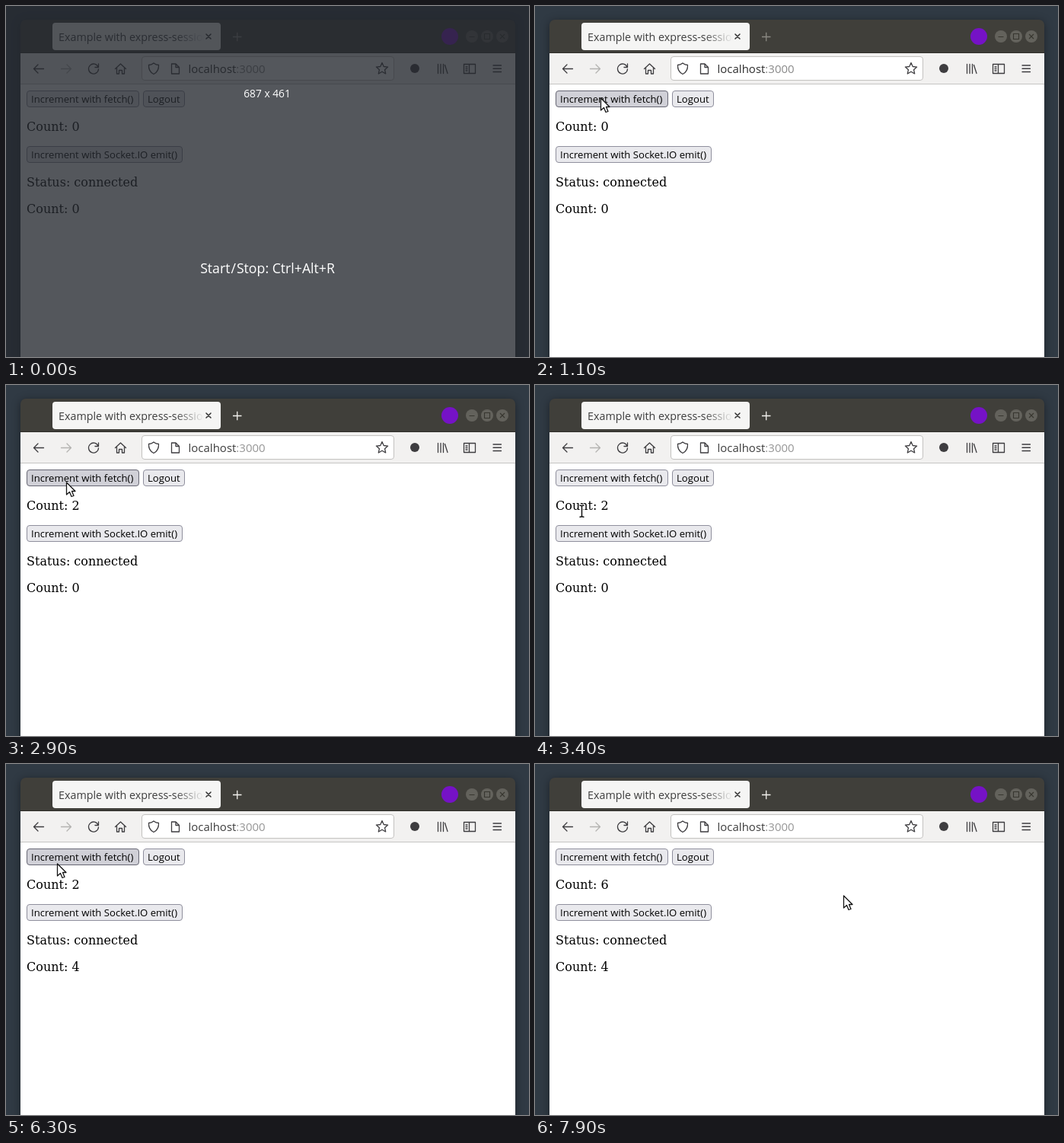
Write an HTML page that moves like this. It is 687 by 461 pixels and loops after 8000 ms.

```html
<!DOCTYPE html>
<html lang="en">
<head>
<meta charset="utf-8">
<title>Session counter</title>
<style>
html, body { margin: 0; width: 100%; height: 100%; overflow: hidden; background: #303a44; }
svg { display: block; width: 687px; height: 461px; }
text { font-family: "Open Sans", "Noto Sans", sans-serif; white-space: pre; }
.window { fill: #403f3a; filter: drop-shadow(0 2px 6px rgba(0, 0, 0, .4)); }
.icon { fill: none; stroke: #3e3d40; stroke-width: 1.3; stroke-linecap: round; stroke-linejoin: round; }
.off { stroke: #b4b3b1; }
.close { stroke: #2e2e2e; stroke-width: 1.5; }
.control { fill: #63625c; }
.glyph { fill: none; stroke: #37362f; stroke-width: 1.1; }
.url { font-size: 15px; }
#host { fill: #2e2e2e; }
#port { fill: #8a8a8a; }
#plus { fill: none; stroke: #8a8983; stroke-width: 1.3; }
.focused #host { fill: #3d3d3d; }
.focused #port { fill: #969696; }
.focused #plus { stroke: #f2f1ee; }
.button rect { fill: #e9e9ed; stroke: #8f8f9d; }
.button text { font-size: 13.15px; font-weight: 500; }
.button.hover rect { fill: #d0d0d7; stroke: #676774; }
.button.pressed rect { fill: #b1b1b9; stroke: #484851; }
.page { font: 16px "DejaVu Serif", serif; }
#overlay text { fill: #fff; font-weight: 500; text-anchor: middle; }
#arrow { fill: #fff; stroke: #161616; stroke-width: 1.3; stroke-linejoin: round; }
#beam { fill: none; }
</style>
</head>
<body>
<svg id="stage" viewBox="0 0 687 461">
  <defs>
    <linearGradient id="fade" gradientUnits="userSpaceOnUse" x1="222" x2="260" y1="0" y2="0">
      <stop stop-color="#3d3d3d"/><stop offset="1" stop-color="#3d3d3d" stop-opacity="0"/>
    </linearGradient>
    <path id="back" d="M6.5 0h-13l5.500-5.500m-5.500 5.500l5.500 5.500"/>
    <path id="cross" d="M-3-3l6 6m0-6l-6 6"/>
    <path id="bar" d="M-2.500-7l3 .7 3-.7m-3 .7v14m-3 .7l3-.7 3 .7"/>
  </defs>

  <rect width="687" height="461" fill="#303a44"/>
  <rect class="window" x="19" y="18" width="650" height="480" rx="7"/>

  <!-- title bar -->
  <rect x="19" y="61" width="650" height="1" fill="#2f2e2a"/>
  <rect x="61" y="22" width="221" height="36" rx="4" fill="#f5f5f4"/>
  <text x="69" y="46" font-size="14.3" fill="url(#fade)">Example with express-session</text>
  <use href="#cross" class="icon close" x="266" y="40"/>
  <path id="plus" d="M298 40.500h11.500m-5.750-5.750v11.500"/>
  <circle cx="583" cy="40" r="11" fill="#7512c6"/>
  <g class="control"><circle cx="612" cy="40" r="8"/><circle cx="632" cy="40" r="8"/><circle cx="652" cy="40" r="8"/></g>
  <path class="glyph" d="M608.500 40.500h7m13-4h7v7h-7z"/>
  <use href="#cross" class="glyph" x="652" y="40"/>

  <!-- toolbar -->
  <rect x="19" y="62" width="650" height="40" fill="#f2f1f0"/>
  <rect x="19" y="102" width="650" height="1" fill="#c6c5c3"/>
  <rect x="19" y="103" width="650" height="358" fill="#fff"/>
  <rect x="178.5" y="66.5" width="331" height="31" rx="3.5" fill="#fff" stroke="#c3c2c0"/>
  <g class="icon">
    <use href="#back" x="43" y="82.5"/>
    <use href="#back" class="off" transform="translate(79 82.5) scale(-1 1)"/>
    <path d="M121 80a6.500 6.500 0 1 0 .5 3m0-7v4.500h-4.500"/>
    <path d="M143.500 82.500l7-6.500 7 6.500m-12-1.500v8h3v-4.500h4v4.500h3v-8"/>
    <path d="M194 75q3 2.500 6.500 2.500 .5 8.500-6.500 12-7-3.500-6.500-12 3.500 0 6.500-2.500z"/>
    <path d="M217.500 76h5.500l4.500 4.500v8.500h-10zm5.500 0v4.500h4.500"/>
    <polygon id="star" transform="translate(494 82.5)"/>
    <path d="M567.500 76.500v12m3.500-12v12m3.500-12v12m2-11l3.500 11"/>
    <path d="M601.500 76.500h15v12h-15zm7 0v12m-4.500-8.500h2m-2 2.500h2m-2 2.500h2"/>
    <path d="M640 78h10.500m-10.500 4.250h10.500m-10.500 4.250h10.500"/>
  </g>
  <circle cx="537" cy="82" r="6" fill="#3e3d40"/>
  <text class="url" x="239.5" y="88"><tspan id="host">localhost</tspan><tspan id="port">:3000</tspan></text>

  <!-- page -->
  <g id="buttons"></g>
  <text class="page" x="27" y="164" id="fetchCount"></text>
  <text class="page" x="27" y="237">Status: connected</text>
  <text class="page" x="27" y="272" id="emitCount"></text>

  <g id="pointer">
    <path id="arrow" d="M.5 1v16l4-3.500 2.500 6 3-1-2.500-6h4.500z"/>
    <g id="beam">
      <use href="#bar" stroke="#fff" stroke-width="3.4"/>
      <use href="#bar" stroke="#111" stroke-width="1.5"/>
    </g>
  </g>

  <g id="overlay">
    <rect width="687" height="461" fill="#24282f" fill-opacity=".78"/>
    <text x="343" y="120" font-size="13.75">687 x 461</text>
    <text x="343.5" y="350.5" font-size="17.7">Start<tspan dx="1">/</tspan><tspan dx="1">Stop: Ctrl+Alt+R</tspan></text>
  </g>
</svg>
<script>
const LOOP = 8000, TICK = 100;
const $ = id => document.getElementById(id);

// Pointer glides: when they begin, how many ticks they take, where they end
const ENTRY = { x: 91, y: 133 };
const glides = [
  { from: 900, ticks: 3, x: 86, y: 120 },
  { from: 2800, ticks: 2, x: 79, y: 127 },
  { from: 3100, ticks: 3, x: 63, y: 185 },
  { from: 3400, ticks: 1, x: 61, y: 165 },
  { from: 3700, ticks: 4, x: 63, y: 191 },
  { from: 5200, ticks: 3, x: 66, y: 161 },
  { from: 6000, ticks: 6, x: 68, y: 115 },
  { from: 7400, ticks: 2, x: 533, y: 189 },
  { from: 7600, ticks: 1, x: 513, y: 188 },
  { from: 7800, ticks: 2, x: 405, y: 172 }
];

// Both buttons raise one shared session count
const replies = [
  { time: 1800, by: "fetch" }, { time: 2300, by: "fetch" },
  { time: 4300, by: "emit" }, { time: 4700, by: "emit" },
  { time: 6700, by: "fetch" }, { time: 7300, by: "fetch" }
];
const presses = [2200, 7200];

const textBox = { x: 27, y: 149, w: 70, h: 22 };
const buttons = {
  fetch: { x: 27, y: 111, w: 148, h: 22, label: "Increment with fetch()" },
  logout: { x: 180, y: 111, w: 55, h: 22, label: "Logout" },
  emit: { x: 27, y: 184, w: 205, h: 22, label: "Increment with Socket.IO emit()" }
};

$("buttons").innerHTML = Object.entries(buttons).map(([id, b]) => `
  <g class="button" id="${id}">
    <rect x="${b.x + .5}" y="${b.y + .5}" width="${b.w - 1}" height="${b.h - 1}" rx="3.5"/>
    <text x="${b.x + 6}" y="${b.y + 16}">${b.label}</text>
  </g>`).join("");

$("star").setAttribute("points", Array.from({ length: 10 }, (_, i) => {
  const r = i % 2 ? 3.7 : 8, a = (i / 5 - .5) * Math.PI;
  return [r * Math.cos(a), r * Math.sin(a)];
}).join(" "));

function pointerAt(t) {
  let p = ENTRY;
  for (const g of glides) {
    if (t < g.from) break;
    const k = Math.min(1, (Math.floor((t - g.from) / TICK) + 1) / g.ticks);
    p = { x: p.x + (g.x - p.x) * k, y: p.y + (g.y - p.y) * k };
  }
  return { x: Math.round(p.x), y: Math.round(p.y) };
}

const inside = (p, b) => p.x >= b.x && p.x < b.x + b.w && p.y >= b.y && p.y < b.y + b.h;
const count = (by, t) => replies.findLastIndex(r => r.by === by && r.time <= t) + 1;
const show = (id, on) => $(id).setAttribute("visibility", on ? "visible" : "hidden");

function draw(t) {
  const p = pointerAt(t);
  const here = t >= glides[0].from;
  const overText = inside(p, textBox);
  const down = presses.some(s => t >= s && t < s + TICK);

  show("overlay", t < TICK);
  $("stage").classList.toggle("focused", t >= 1600);
  for (const id in buttons) {
    const over = here && inside(p, buttons[id]);
    $(id).classList.toggle("hover", over);
    $(id).classList.toggle("pressed", over && down);
  }
  for (const by of ["fetch", "emit"]) $(by + "Count").textContent = "Count: " + count(by, t);

  $("pointer").setAttribute("transform", `translate(${p.x} ${p.y})`);
  show("arrow", here && !overText);
  show("beam", here && overText);
}

const start = performance.now();
function tick() {
  draw((performance.now() - start) % LOOP);
  requestAnimationFrame(tick);
}
tick();
</script>
</body>
</html>
```
